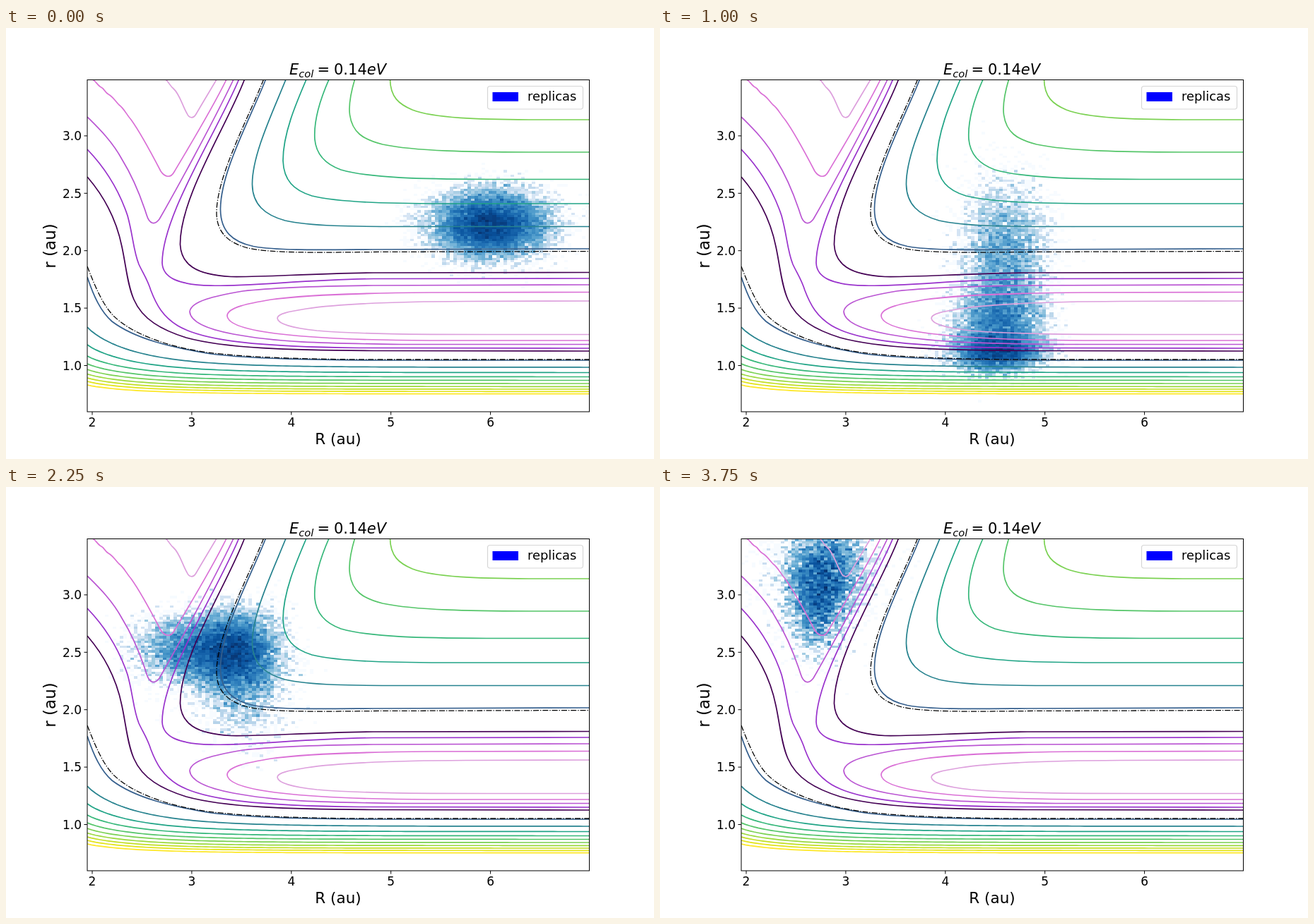
An HTML page with a canvas for the animation above (4000 ms loop, 917x611 px).

```html
<!DOCTYPE html>
<html lang="en">
<head>
<meta charset="utf-8">
<title>Replica density</title>
<style>
  html, body { margin: 0; width: 100%; height: 100%; overflow: hidden; background: #fff; }
  canvas, svg { position: absolute; left: 0; top: 0; width: 917px; height: 611px; }
  text { font-family: "DejaVu Sans", sans-serif; font-size: 17px; }
  .contours { fill: none; stroke-width: 1.7; }
  .math { font-size: 21px; }
  .it { font-style: italic; }
</style>
</head>
<body>
<canvas id="cloud" width="917" height="611"></canvas>
<svg viewBox="0 0 917 611">
  <clipPath id="plot"><rect x="115" y="73.5" width="710.5" height="470.5"/></clipPath>
  <g class="contours" clip-path="url(#plot)">
    <g id="repulsive"></g>
    <path stroke="#7ad151" d="M543.5 73C544 98 556 108 575 116C606 128 670 129.5 740 130H826"/>
    <path stroke="#54c568" d="M493.5 73C487 95 485 112 486.5 123C490 148 505 158 533 165C580 175 660 175.5 740 176H826"/>
    <path stroke="#35b779" d="M457 73C446 98 435 130 437 158C439 180 452 193 474 201C515 213 590 214 680 214.5H826"/>
    <path stroke="#20a486" d="M425 73C410 108 392 150 392 188C393 216 407 230 433 238C475 248 550 249 640 249H826"/>
    <path stroke="#26828e" d="M396 73C378 118 348 180 348.5 222C349 250 366 265 395 273C430 281 490 281.5 560 281.5H826"/>
    <g stroke="#355f8d">
      <path d="M367.5 73C345 130 303 205 303.5 258C304 288 320 303 350 309.5C385 316 450 314.5 520 314L826 313"/>
      <path d="M115 353C124 380 134 402 150 416C183 441 235 453 290 462C350 469.5 440 470.5 540 471H826"/>
    </g>
    <g stroke="#440154">
      <path d="M337.5 73C312 140 246 240 246.5 307C248 335 268 350 318 352.5C360 353.5 430 348 520 347L826 346.5"/>
      <path d="M115 211C140 240 157 275 164 310C170 338 172 365 181 385C193 413 220 428 255 439C310 454 400 457 520 457.5L826 458"/>
    </g>
    <g stroke="#9932cc">
      <path d="M329.5 73C300 145 221 265 221 333C222 355 245 364 290 365.2C350 366 420 357 520 355.5L826 355"/>
      <path d="M115 172C140 198 160 230 172 266C180 295 180 315 188 335C194 348 200 356 205 372C213 393 222 409 243 422C280 444 360 452 500 453.5L826 454"/>
    </g>
    <g stroke="#ba55d3">
      <path d="M115 126C130 141 150 160 164 186C180 212 191 240 199 265C203 278 210 280 217 271C235 240 290 140 322 73"/>
      <path d="M826 364L520 365C430 366 370 369 335 373C295 380 262 387 260 402C261 417 285 427 322 434C380 445 440 447 560 448.5H826"/>
    </g>
    <g stroke="#da70d6">
      <path d="M122 73C126 74 128 79 133 83C140 86 139 91 145 94C152 98 154 103 160 109C167 114 170 122 177 130C190 148 206 178 219 203C225 212 233 213 238 204C255 175 290 118 312 73"/>
      <path d="M826 374.5L600 375C480 376 420 379 375 385C345 390 313 396 313 408C314 421 345 429 390 434C440 440 500 442.5 600 443H826"/>
    </g>
    <g stroke="#dda0dd">
      <path d="M226 73C230 76 232 82 237 86C246 94 249 109 256 121C259 128 265 129 269 122C277 108 288 90 298 73"/>
      <path d="M826 387L650 387.5C530 388 465 392 425 398C400 402 384 405 384 411.5C385 420 405 425 440 429C500 434 580 434.5 680 434.5H826"/>
    </g>
    <g stroke="#000" stroke-width="1.27" stroke-dasharray="8 2 1.3 2">
      <path d="M364.5 73C342 130 297 212 298 264C299 292 317 306 345 312.5C380 319 430 318.5 520 317.5L826 316.5"/>
      <path d="M115 338C126 366 136 391 152 408C180 435 230 452 285 460C350 468 440 470 540 470H826"/>
    </g>
  </g>
  <rect x="115" y="73.5" width="710.5" height="470.5" fill="none" stroke="#000"/>
  <g id="ticks"></g>
  <rect x="681.5" y="82.5" width="135" height="32.5" rx="3.5" fill="#fff" fill-opacity=".8" stroke="#ccc" stroke-opacity=".8" stroke-width="1.2"/>
  <rect x="688.5" y="91" width="36.5" height="13" fill="#00f"/>
  <text x="738" y="103" style="font-size:17.9px">replicas</text>
  <text class="math it" x="401" y="66">E</text>
  <text class="it" x="414.3" y="69.5" style="font-size:14.7px">col</text>
  <text class="math" x="440.6" y="66">=</text>
  <text class="math" x="464" y="66">0.14<tspan class="it">eV</tspan></text>
  <text x="470" y="590" text-anchor="middle" style="font-size:21.5px">R (au)</text>
  <text transform="translate(70 309) rotate(-90)" text-anchor="middle" style="font-size:23px">r (au)</text>
</svg>
<script>
const LEFT = 115, TOP = 73.5, WIDTH = 710.5, HEIGHT = 470.5;
const BINS = 140, STEP = 250, LOOP = 4000;
const make = (parent, tag, attrs, text = '') => {
  const el = document.createElementNS('http://www.w3.org/2000/svg', tag);
  for (const k in attrs) el.setAttribute(k, attrs[k]);
  el.textContent = text;
  document.getElementById(parent).append(el);
};

// Lower wall: [colour, height at the left edge, height at the right edge]
[['#26828e', 424, 481], ['#20a486', 449, 488.5], ['#35b779', 465, 494.5],
 ['#54c568', 476, 499.5], ['#7ad151', 484, 504], ['#9bd93c', 490.5, 508.3],
 ['#c2df23', 496, 512], ['#e2e418', 501, 515.3], ['#fde725', 506, 518.7]
].forEach(([stroke, y0, y1]) => {
  let d = '';
  for (let x = LEFT; x < 830; x += 6) {
    const y = y1 - (y1 - y0) * Math.exp(-(((x - LEFT) / 72) ** 0.9));
    d += `${d ? 'L' : 'M'}${x} ${y.toFixed(2)}`;
  }
  make('repulsive', 'path', { d, stroke });
});

for (let R = 2; R <= 6; R++) {
  const x = 122 + (R - 2) * 140.9;
  make('ticks', 'path', { d: `M${x} 544v4.5`, stroke: '#000' });
  make('ticks', 'text', { x, y: 565, 'text-anchor': 'middle' }, R);
}
for (let r = 1; r <= 3; r += 0.5) {
  const y = 478.5 - (r - 1) * 162.8;
  make('ticks', 'path', { d: `M115 ${y}h-4.5`, stroke: '#000' });
  make('ticks', 'text', { x: 107, y: y + 6.2, 'text-anchor': 'end' }, r.toFixed(1));
}

// Blobs are [x, y, spread x, spread y, weight]; n is the replica count.
const KEYS = [
  { t: 0, n: 16000, blobs: [[685, 278, 40, 23, 1]] },
  { t: 250, n: 16000, blobs: [[637, 252, 39, 30, 1]] },
  { t: 500, n: 16000, blobs: [[588, 262, 38, 37, 1]] },
  { t: 1000, n: 16000, blobs: [[477, 457, 33, 15, 1.1], [482, 410, 32, 33, 1], [488, 315, 31, 49, 0.8]] },
  { t: 1250, n: 16000, blobs: [[440, 462, 35, 15, 1.2], [440, 430, 35, 24, 1.2], [445, 390, 33, 35, 0.6]] },
  { t: 1500, n: 16000, blobs: [[408, 457, 35, 17, 1.2], [404, 410, 35, 26, 1.1], [398, 367, 34, 26, 0.9]] },
  { t: 2000, n: 16000, blobs: [[367, 280, 31, 27, 1.8], [290, 245, 37, 25, 0.8], [350, 345, 31, 36, 0.3]] },
  { t: 2750, n: 14000, blobs: [[233, 145, 34, 36, 1.9], [193, 200, 35, 26, 0.7], [315, 200, 31, 35, 0.2]] },
  { t: 3750, n: 6500, blobs: [[238, 115, 29, 35, 1.4], [222, 168, 23, 36, 1.2], [222, 110, 46, 36, 0.5]] }
];
const mix = (a, b, k) => a + (b - a) * k;

function stateAt(t) {
  let i = 0;
  while (i < KEYS.length - 2 && t > KEYS[i + 1].t) i++;
  const a = KEYS[i], b = KEYS[i + 1], k = (t - a.t) / (b.t - a.t);
  const blobs = [0, 1, 2].map(j => {
    const to = b.blobs[j] || b.blobs[0];
    return (a.blobs[j] || a.blobs[0]).map((v, m) => mix(v, to[m], k));
  });
  return { blobs, n: mix(a.n, b.n, k) };
}

function seeded(seed) {
  return () => {
    seed = seed + 0x6D2B79F5 | 0;
    let z = Math.imul(seed ^ seed >>> 15, 1 | seed);
    z = z + Math.imul(z ^ z >>> 7, 61 | z) ^ z;
    return ((z ^ z >>> 14) >>> 0) / 4294967296;
  };
}

const BLUES = ['f7fbff', 'deebf7', 'c6dbef', '9ecae1', '6baed6', '4292c6', '2171b5', '08519c', '08306b']
  .map(h => [0, 2, 4].map(i => parseInt(h.slice(i, i + 2), 16)));
function blue(v) {
  const p = v * (BLUES.length - 1), i = Math.min(Math.floor(p), BLUES.length - 2);
  return `rgb(${BLUES[i].map((c, j) => Math.round(mix(c, BLUES[i + 1][j], p - i)))})`;
}

const ctx = document.getElementById('cloud').getContext('2d');
function drawCloud(step) {
  const { blobs, n } = stateAt(step * STEP);
  const random = seeded(911 + step * 7919);
  const total = blobs.reduce((sum, b) => sum + b[4], 0);
  const counts = new Uint16Array(BINS * BINS);
  for (let i = 0; i < n; i++) {
    let pick = random() * total, j = 0;
    while (j < 2 && pick > blobs[j][4]) pick -= blobs[j++][4];
    const [mx, my, sx, sy] = blobs[j];
    const radius = Math.sqrt(-2 * Math.log(1 - random())), angle = 2 * Math.PI * random();
    const col = Math.floor((mx + sx * radius * Math.cos(angle) - LEFT) / WIDTH * BINS);
    const row = Math.floor((my + sy * radius * Math.sin(angle) - TOP) / HEIGHT * BINS);
    if (col >= 0 && col < BINS && row >= 0 && row < BINS) counts[row * BINS + col]++;
  }
  // Logarithmic colour scale from one replica to the fullest bin
  const logPeak = Math.log(Math.max(...counts));
  const edgeX = c => Math.round(LEFT + c * WIDTH / BINS);
  const edgeY = r => Math.round(TOP + r * HEIGHT / BINS);
  ctx.clearRect(0, 0, 917, 611);
  counts.forEach((count, i) => {
    if (!count) return;
    const c = i % BINS, r = Math.floor(i / BINS), x = edgeX(c), y = edgeY(r);
    ctx.fillStyle = blue(Math.log(count) / logPeak);
    ctx.fillRect(x, y, edgeX(c + 1) - x, edgeY(r + 1) - y);
  });
}

let shown = -1;
const start = performance.now();
function tick() {
  const step = Math.floor((performance.now() - start) % LOOP / STEP);
  if (step !== shown) drawCloud(shown = step);
  requestAnimationFrame(tick);
}
tick();
</script>
</body>
</html>
```
